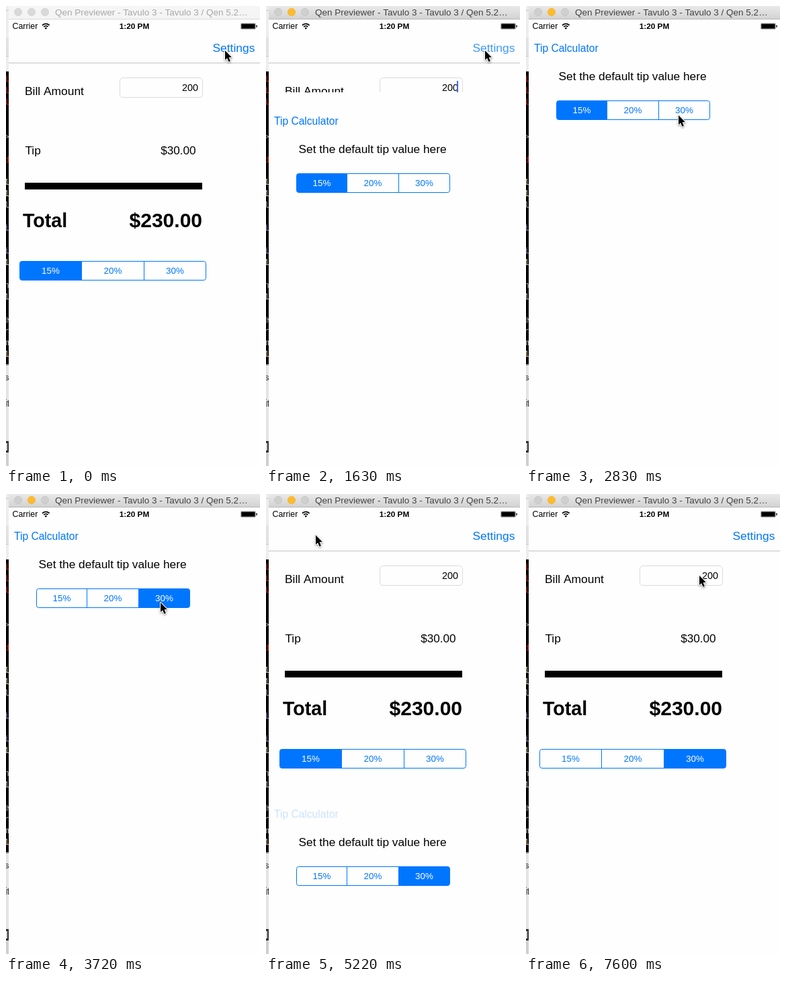
Animation, 378 px wide and 682 px high, one loop 8000 ms. Source, as an HTML page with a canvas:

```html
<!DOCTYPE html>
<html lang="en">
<head>
<meta charset="utf-8">
<title>Tip calculator</title>
<style>
html, body { margin: 0; width: 100%; height: 100%; overflow: hidden; background: #fff; }
canvas { display: block; width: 378px; height: 682px; }
</style>
</head>
<body>
<canvas id="stage" width="378" height="682"></canvas>
<script>
const ctx = document.getElementById('stage').getContext('2d');
const LOOP = 8000;
const BLUE = '#0076ff';
const SANS = '"Liberation Sans", Arial, sans-serif';
const MONO = '"Liberation Mono", monospace';

// Pointer tip: [time, x, y]
const POINTER = [
  [0, 326, 66], [2380, 262, 118], [2530, 207, 162], [2830, 227, 162],
  [2980, 229, 162], [3130, 230, 161], [4170, 190, 130], [4320, 110, 80],
  [4470, 73, 59], [4770, 74, 61], [6560, 85, 142], [6710, 129, 300],
  [7010, 176, 228], [7160, 212, 147], [7450, 244, 135], [7600, 258, 121]
];
const CARET_ON = [[0, 0], [150, 1], [740, 0], [1190, 1], [1780, 0]];
const SETTINGS_ALPHA = [[0, 1], [1040, .45], [1190, .2], [1340, .35], [1480, .55], [1630, .75], [2080, 1]];
const DEFAULT_TIP = [[0, 1, 0, 0], [3430, 1, 0, .15], [3580, .4, 0, .6], [3720, 0, 0, 1]];
const CURRENT_TIP = [[0, 1, 0, 0], [5660, 0, 0, 1]];

// Glyph edges of the terminal behind the window: [character, baseline, colour]
const TERMINAL = [
  ['i', 112, '#c81e14'], ['i', 129, '#c81e14'], ['i', 146, '#c81e14'],
  ['>', 198, '#aaa'], ['d', 232, '#c81e14'], ['1', 265, '#d8c9a8'],
  ['1', 282, '#d8c9a8'], ['l', 299, '#aab'], ['i', 333, '#88b'],
  ['i', 367, '#88b'], ['1', 384, '#d8c9a8'], ['n', 418, '#bbb'],
  ['1', 435, '#bbb'], ['e', 469, '#bbb'], ['r', 486, '#bbb'],
  ['m', 503, '#bbb'], ['1', 520, '#d8b98c']
];

function stepAt(keys, t) {
  let value = keys[0];
  for (const key of keys) if (key[0] <= t) value = key;
  return value.slice(1);
}

function rect(x, y, w, h, color) {
  ctx.fillStyle = color;
  ctx.fillRect(x, y, w, h);
}

function text(str, x, y, size, color = '#000', align = 'left', weight = 400, family = SANS) {
  ctx.font = `${weight} ${size}px ${family}`;
  ctx.textAlign = align;
  ctx.fillStyle = color;
  ctx.fillText(str, x, y);
}

function faded(alpha, draw) {
  ctx.save();
  ctx.globalAlpha = alpha;
  draw();
  ctx.restore();
}

function roundBox(x, y, w, h, r) {
  ctx.beginPath();
  ctx.roundRect(x, y, w, h, r);
}

function segments(edges, y, levels) {
  const left = edges[0], width = edges[3] - left;
  ctx.save();
  roundBox(left, y, width, 28, 3.2);
  ctx.clip();
  levels.forEach((level, i) => faded(level, () =>
    rect(edges[i], y, edges[i + 1] - edges[i], 28, BLUE)));
  ctx.restore();

  ctx.strokeStyle = BLUE;
  ctx.lineWidth = 1;
  roundBox(left, y, width, 28, 3.2);
  for (const x of edges.slice(1, 3)) {
    ctx.moveTo(x, y);
    ctx.lineTo(x, y + 28);
  }
  ctx.stroke();
  ['15%', '20%', '30%'].forEach((label, i) =>
    text(label, (edges[i] + edges[i + 1]) / 2, y + 18.5, 13.4, levels[i] > .5 ? '#fff' : BLUE, 'center'));
}

function backdrop() {
  rect(0, 0, 4, 97, '#ededed');
  rect(0, 6, 4, 1, '#c4c4c4');
  rect(0, 47, 4, 28, '#e2e2e2');
  rect(0, 74, 4, 1, '#c4c4c4');
  rect(0, 97, 4, 434, '#000');
  rect(0, 531, 4, 114, '#e4e4e4');
  rect(0, 531, 4, 2, '#999');
  rect(0, 645, 4, 37, '#cfcfcf');
  rect(0, 645, 4, 17, '#333');
  rect(0, 648, 2, 11, '#cfcfcf');
  ctx.save();
  ctx.beginPath();
  ctx.rect(0, 0, 4, 682);
  ctx.clip();
  for (const [char, y, color] of TERMINAL) text(char, -3, y, 13, color, 'left', 400, MONO);
  text('s', -2, 555, 13, '#222');
  text('it', -1.5, 594, 14, '#222');
  ctx.restore();
}

function titleBar(active) {
  const shade = ctx.createLinearGradient(0, 0, 0, 19);
  shade.addColorStop(0, active ? '#e9e9e9' : '#f6f6f6');
  shade.addColorStop(1, active ? '#d3d3d3' : '#f4f4f4');
  rect(4, 0, 374, 20, shade);
  rect(4, 19, 374, 1, active ? '#b9b9b9' : '#dadada');
  for (let i = 0; i < 3; i++) {
    const lit = active && i === 1;
    ctx.beginPath();
    ctx.arc(18 + 20 * i, 9, 5.6, 0, 7);
    ctx.fillStyle = lit ? '#fdbc2f' : active ? '#cfcfcf' : '#d9d9d9';
    ctx.strokeStyle = lit ? '#f3b02c' : active ? '#c4c4c4' : '#d2d2d2';
    ctx.lineWidth = .8;
    ctx.fill();
    ctx.stroke();
  }
  text('Qen Previewer - Tavulo 3 - Tavulo 3 / Qen 5.2…', 73, 14, 13.5, active ? '#414141' : '#a8a8a8');
}

function statusBar() {
  text('Carrier', 9.5, 34, 12.4);
  text('1:20 PM', 191, 34, 11.8, '#000', 'center', 700);
  ctx.strokeStyle = '#000';
  ctx.lineWidth = 1.7;
  for (const r of [4.2, 7.3]) {
    ctx.beginPath();
    ctx.arc(59.3, 33.7, r, -Math.PI * .76, -Math.PI * .24);
    ctx.stroke();
  }
  ctx.fillStyle = '#000';
  ctx.beginPath();
  ctx.moveTo(59.3, 34.7);
  ctx.arc(59.3, 34.2, 2.4, -Math.PI * .76, -Math.PI * .24);
  ctx.fill();

  ctx.strokeStyle = '#777';
  ctx.lineWidth = .6;
  roundBox(349.4, 25.7, 22, 8.6, 1.6);
  ctx.stroke();
  rect(350.2, 26.4, 20.4, 7.2, '#000');
  rect(372.3, 28.5, 1.4, 3, '#000');
}

function calculator(t) {
  faded(stepAt(SETTINGS_ALPHA, t)[0], () => text('Settings', 307.5, 68, 17.4, BLUE));
  rect(4, 84, 374, 1, '#c3c3c3');
  text('Bill Amount', 28, 132, 17.4);
  ctx.strokeStyle = '#dcdcdc';
  ctx.lineWidth = 1;
  roundBox(169.5, 106.5, 123, 29, 4.5);
  ctx.stroke();
  text('200', 286, 126, 14.4, '#000', 'right');
  if (stepAt(CARET_ON, t)[0]) rect(284, 111, 2, 19, '#426bf2');
  text('Tip', 28.5, 220, 17.2);
  text('$30.00', 282.5, 220, 17.1, '#000', 'right');
  rect(28, 262, 264, 10, '#000');
  text('Total', 25, 328, 28.6, '#000', 'left', 700);
  text('$230.00', 292, 328, 30, '#000', 'right', 700);
  segments([20.5, 112.5, 205.5, 297.5], 378.5, stepAt(CURRENT_TIP, t));
}

// Distance of the settings sheet below its resting place; null when hidden
function sheetOffset(t) {
  if (t < 1480 || t >= 5360) return null;
  if (t >= 5220) return 412;
  return Math.round(493 * Math.pow(.22, Math.floor((t - 1480) / 150)));
}

function sheet(t) {
  const offset = sheetOffset(t);
  if (offset === null) return;
  ctx.save();
  ctx.translate(0, offset);
  rect(4, 20, 374, 662, '#fefefe');
  faded(t >= 5220 ? .2 : 1, () => text('Tip Calculator', 12, 68, 15.6, BLUE));
  text('Set the default tip value here', 48.5, 109.5, 17.3);
  segments([45.5, 120.5, 197.5, 273.5], 140.5, stepAt(DEFAULT_TIP, t));
  ctx.restore();
}

function pointer(t) {
  const [x, y] = stepAt(POINTER, t);
  ctx.save();
  ctx.translate(x, y);
  ctx.beginPath();
  [[0, 0], [0, 14], [3.1, 11.2], [5.5, 16.8], [7.9, 15.8], [5.6, 10.3], [9.9, 10]]
    .forEach(([px, py]) => ctx.lineTo(px, py));
  ctx.closePath();
  ctx.lineJoin = 'round';
  ctx.lineWidth = 2;
  ctx.strokeStyle = '#fff';
  ctx.shadowColor = 'rgba(0,0,0,.45)';
  ctx.shadowBlur = 3;
  ctx.shadowOffsetY = 1;
  ctx.stroke();
  ctx.shadowColor = 'transparent';
  ctx.fillStyle = '#000';
  ctx.fill();
  ctx.restore();
}

function draw(now) {
  const t = now % LOOP;
  backdrop();
  rect(4, 0, 374, 682, '#fefefe');
  calculator(t);
  sheet(t);
  statusBar();
  titleBar(t >= 600);
  pointer(t);
}

let start;
function tick(now) {
  start ??= now;
  draw(now - start);
  requestAnimationFrame(tick);
}
draw(0);
requestAnimationFrame(tick);
</script>
</body>
</html>
```
